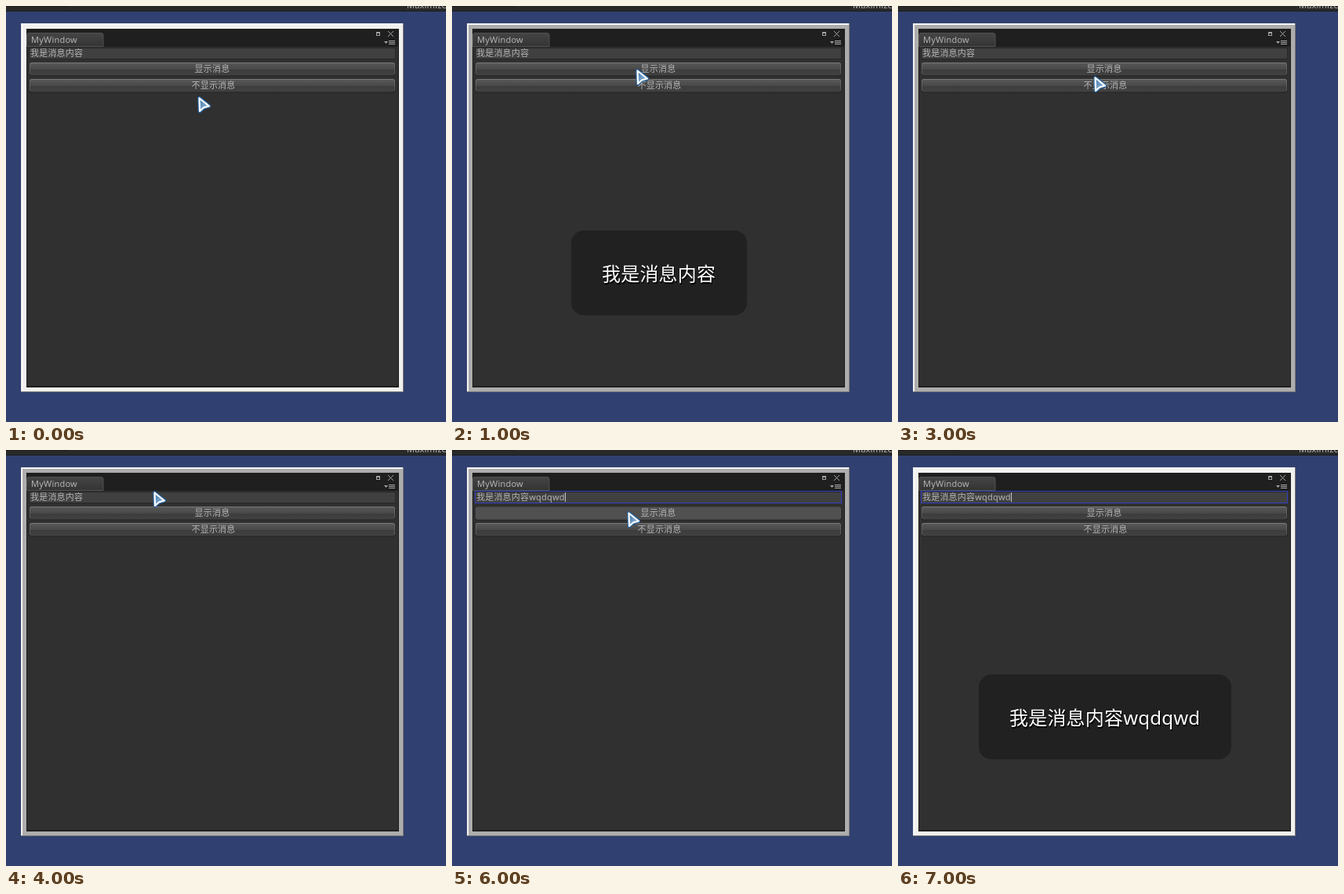
An HTML page for the animation above (8500 ms loop, 561 by 530 pixels).

```html
<!DOCTYPE html>
<html lang="zh">
<head>
<meta charset="utf-8">
<style>
html, body { margin: 0; width: 100%; height: 100%; overflow: hidden; background: #304070; }
svg { display: block; }
text { font: 11px "Noto Sans", "Noto Sans CJK SC", sans-serif; letter-spacing: .2px; fill: #b4b4b4; white-space: pre; }
.mid { text-anchor: middle; }
#toast text { font-size: 24px; }
.crisp { shape-rendering: crispEdges; }
</style>
</head>
<body>
<svg width="561" height="530" viewBox="0 0 561 530">
  <defs>
    <linearGradient id="up" x2="0" y2="1">
      <stop offset="0" stop-color="#575757"/><stop offset=".5" stop-color="#484848"/>
      <stop offset=".5" stop-color="#3c3c3c"/><stop offset="1" stop-color="#424242"/>
    </linearGradient>
    <linearGradient id="tab" x2="0" y2="1">
      <stop offset="0" stop-color="#454545"/><stop offset="1" stop-color="#343434"/>
    </linearGradient>
    <linearGradient id="steel" x2="1" y2="1">
      <stop offset="0" stop-color="#3f74a8"/><stop offset="1" stop-color="#a4c8e6"/>
    </linearGradient>
    <g id="button">
      <rect x="29.5" y=".5" width="467" height="17" rx="3" fill="#222"/>
      <rect x="30" width="466" height="16" rx="3" fill="#7a7a7a"/>
      <rect x="30.5" y="1" width="465" height="15.5" rx="2.5" fill="url(#up)"/>
    </g>
  </defs>

  <!-- Toolbar strip -->
  <g class="crisp">
    <rect width="561" height="7" fill="#1c1c1c"/>
    <rect width="561" height="6" fill="#292929"/>
    <rect width="78" height="1" fill="#1e1e1e"/>
    <rect x="78" width="1" height="2" fill="#1e1e1e"/>
  </g>
  <text x="511" y="3">Maximize on Play</text>

  <!-- Window frame -->
  <g class="crisp">
    <rect x="19" y="22" width="488" height="470" fill="#767676"/>
    <rect x="19" y="22" width="487" height="469" fill="#e3e3e3"/>
    <rect x="20" y="23" width="486" height="468" fill="#fff"/>
    <rect id="frame" x="21" y="24" width="485" height="467"/>
    <rect x="26" y="29" width="475" height="457" fill="#1f1f1f"/>
    <rect x="27" y="52" width="473" height="432" fill="#303030"/>
  </g>
  <path d="M26.5 51.5V37q0-2.5 2.5-2.5H121.500q2.500 0 2.500 2.500V51.500z" fill="url(#tab)" stroke="#505050"/>
  <text x="32" y="47" letter-spacing=".3">MyWindow</text>
  <g fill="none" stroke="#a5a5a5">
    <path class="crisp" d="M472.500 34.500h4v3h-4zM472 33.500h5M488 44.500h8M488 46.500h8M488 48.500h8"/>
    <path d="M487 32l7 7M494 32l-7 7"/>
  </g>
  <path d="M482 45h5l-2.500 3z" fill="#a5a5a5"/>

  <!-- Text field -->
  <g class="crisp">
    <rect x="29" y="53" width="468" height="15" fill="#272727"/>
    <rect x="30" y="54" width="466" height="13" fill="#404040"/>
    <g id="focus">
      <rect x="29.500" y="52.500" width="467" height="15" fill="none" stroke="#3340c0"/>
      <rect id="caret" y="54" width="1" height="12" fill="#c8c8c8"/>
    </g>
  </g>
  <text id="field" x="31" y="64"></text>

  <!-- Buttons -->
  <use href="#button" y="72"/>
  <g id="pressed">
    <rect x="29.500" y="72" width="467" height="17.500" rx="3" fill="#262626"/>
    <rect x="30" y="72.500" width="466" height="16" rx="3" fill="#606060"/>
    <rect x="30.500" y="73" width="465" height="15" rx="2.500" fill="#505050"/>
  </g>
  <use href="#button" y="93"/>
  <text class="mid" x="263" y="84">显示消息</text>
  <text class="mid" x="264.500" y="105">不显示消息</text>

  <!-- Message -->
  <g id="toast">
    <rect id="box" y="286" height="108" rx="16" fill="#212121"/>
    <text id="shade" y="351.500" style="fill:#000"></text>
    <text id="message" y="350" style="fill:#fff"></text>
  </g>

  <g id="cursor" stroke-linejoin="round">
    <path id="arrow" d="M2.500 2.500L3 19L8 14.500L15 12.500Z" fill="#235f9a" stroke="#235f9a" stroke-width="4.600"/>
    <path d="M2.500 2.500L3 19L8 14.500L15 12.500Z" fill="url(#steel)" stroke="#fff" stroke-width="2.200"/>
  </g>
</svg>
<script>
const STEP = 500, LOOP = 8500;
const $ = id => document.getElementById(id);
const show = (id, on) => $(id).setAttribute("visibility", on ? "visible" : "hidden");

// [first step, x, y] of each cursor stop
const stops = [
  [0, 244, 115], [1, 234, 80], [3, 260, 102], [6, 249, 89], [7, 247, 81],
  [8, 187, 52], [9, 175, 54], [10, 171, 56], [11, 195, 67], [12, 223, 78]
];

function render(step) {
  const typed = step >= 11;
  const text = "我是消息内容" + (typed ? "wqdqwd" : "");
  const [, x, y] = stops.findLast(stop => stop[0] <= step);
  $("cursor").setAttribute("transform", `translate(${x} ${y})`);
  show("cursor", step < 14);

  $("frame").setAttribute("fill", step < 2 || step >= 14 ? "#f1f1ef" : "#adadad");
  $("field").textContent = text;
  $("caret").setAttribute("x", typed ? 144 : 98);
  show("focus", step >= 10);
  show("pressed", step === 12);

  const width = typed ? 322 : 224, left = 264 - width / 2;
  show("toast", step === 2 || step === 3 || step >= 13);
  $("box").setAttribute("x", left);
  $("box").setAttribute("width", width);
  for (const [id, dx] of [["shade", 40], ["message", 39]]) {
    $(id).textContent = text;
    $(id).setAttribute("x", left + dx);
  }
}

let last = -1;
const start = performance.now();
function tick() {
  const step = Math.floor((performance.now() - start) % LOOP / STEP);
  if (step !== last) render(last = step);
  requestAnimationFrame(tick);
}
tick();
</script>
</body>
</html>
```
